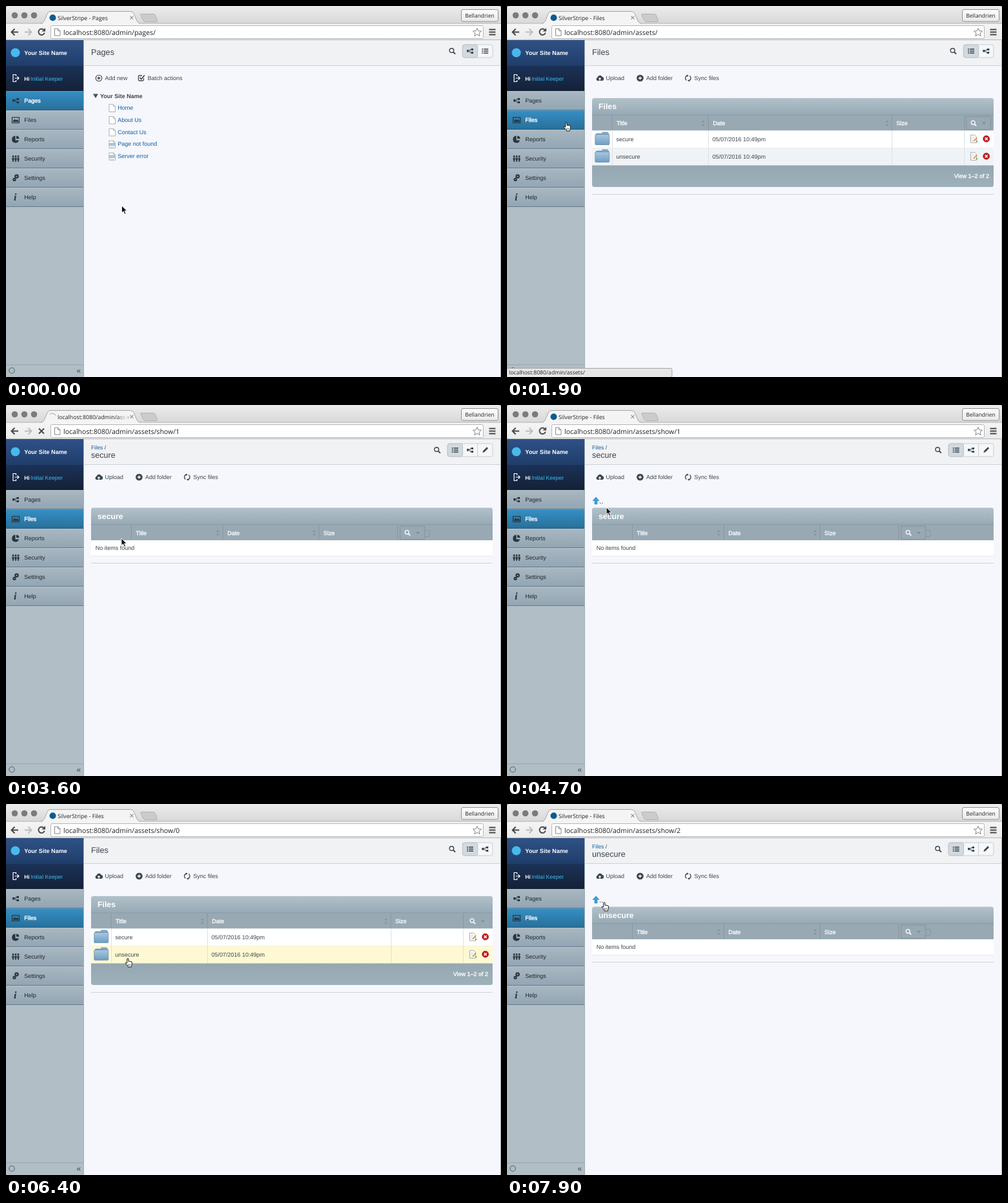
These frames come from a looping animation (768x576 px, 8000 ms). An HTML page:

```html
<!DOCTYPE html>
<html lang="en">
<head>
<meta charset="utf-8">
<title>Files admin</title>
<style>
html, body { margin: 0; width: 768px; height: 576px; overflow: hidden; background: #f6f7fc; }
svg { display: block; }
text { font: 9px "Liberation Sans", Arial, sans-serif; fill: #3b444c; text-rendering: geometricPrecision; white-space: pre; }
.ui { font-family: "Open Sans", sans-serif; fill: #222; }
.link { fill: #0a5fa8; }
.bold { font-weight: bold; }
.white { fill: #fff; }
.strong { fill: #fff; stroke: #fff; stroke-width: .3; }
.user { fill: #3ebcf3; }
.info { font-family: "Liberation Serif", serif; font-style: italic; font-weight: bold; fill: #2a353d; }
.menu { fill: #1d2830; }
.menu.hover { fill: #39454d; }
.menu.on { fill: #fff; stroke: #fff; stroke-width: .35; }
</style>
</head>
<body>
<svg id="stage" width="768" height="576" viewBox="0 0 768 576"></svg>
<script>
const LOOP = 8000, STEP = 100;
const INK = '#3c4750', DARK = '#2a353d';

const rect = (x, y, w, h, fill, more = '') =>
  `<rect x="${x}" y="${y}" width="${w}" height="${h}" fill="${fill}" ${more}/>`;
const disc = (x, y, r, fill, more = '') => `<circle cx="${x}" cy="${y}" r="${r}" fill="${fill}" ${more}/>`;
const shape = (d, fill, more = '') => `<path d="${d}" fill="${fill}" ${more}/>`;
const line = (d, color = INK, width = 1, more = '') =>
  `<path d="${d}" fill="none" stroke="${color}" stroke-width="${width}" ${more}/>`;
const text = (x, y, s, cls = '', size = 9, more = '') =>
  `<text x="${x}" y="${y}" class="${cls}" style="font-size:${size}px" ${more}>${s}</text>`;
const group = (id, body) => `<g id="${id}">${body}</g>`;
const fade = (id, from, to, dir = 'x2="0" y2="1"') =>
  `<linearGradient id="${id}" ${dir}><stop stop-color="${from}"/><stop offset="1" stop-color="${to}"/></linearGradient>`;

// Icons
const tree = (x, y, c = INK) =>
  rect(x - 5, y - 2, 3.5, 3.5, c) + rect(x + 1.5, y - 4, 3.5, 3, c) + rect(x + 1.5, y + 1, 3.5, 3, c) +
  line(`M${x - 1.5} ${y - .2}h1.500M${x + 1.5} ${y - 2.5}h-1.500v5h1.500`, c, .7);
const list = (x, y) => [-3, 0, 3].map(d =>
  rect(x - 5, y + d - .8, 2, 1.6, INK) + rect(x - 2, y + d - .8, 7, 1.6, INK)).join('');
const pencil = (x, y) => shape(`M${x - 4} ${y + 4}l1-3 5-5 2 2-5 5z`, INK) +
  line(`M${x + 2.2} ${y - 4.2}l2 2`, INK, 1.6);
const lens = (x, y, c = INK, k = 1) => disc(x - k, y - k, 3.3 * k, 'none', `stroke="${c}" stroke-width="${1.4 * k}"`) +
  line(`M${x + 1.5 * k} ${y + 1.5 * k}l${3.2 * k} ${3.2 * k}`, c, 1.9 * k);
const sorter = (x, y) => shape(`M${x - 2.5} ${y - 1.5}l2.5-3 2.5 3zM${x - 2.5} ${y + 1.5}l2.5 3 2.5-3z`, '#7f929e');
const sheet = (x, y, banner) =>
  shape(`M${x} ${y}h6.5l3 3v8.5h-9.5z`, '#fdfdfd', 'stroke="#a5a9a8" stroke-width=".9"') +
  line(`M${x + 6.5} ${y}v3h3`, '#a5a9a8', .8) +
  (banner ? rect(x, y + 4, 9.5, 4, '#8fb6cf') + line(`M${x + 1} ${y + 6}h7.5`, '#e8f1f6', 1, 'stroke-dasharray="2 .8"') +
    line(`M${x + 2} ${y + 10}h5`, '#a9c4d3', .8) : '');
const folder = (x, y) =>
  shape(`M${x + 2} ${y + 3}v-2h9v-2h8l2 2v4z`, '#86a9c4', 'stroke="#6489a7" stroke-width=".7"') +
  rect(x, y + 2.5, 22, 16, 'url(#folder)', 'rx="1.2" stroke="#5f88a8" stroke-width=".7"');
const editIcon = (x, y) => shape(`M${x} ${y}h6l3 3v9h-9z`, '#fff', 'stroke="#8b969c" stroke-width=".8"') +
  line(`M${x + 1.5} ${y + 4}h4m-4 2.5h3m-3 2.5h4`, '#b9c9d4', .8) +
  line(`M${x + 4.5} ${y + 9.5}l5-5.5`, '#dd9a3c', 2) + line(`M${x + 8} ${y + 10}h3`, '#69a84a', 1.5);
const cross = (x, y) => disc(x, y, 5, '#c2191f', 'stroke="#951217" stroke-width=".6"') +
  line(`M${x - 2} ${y - 2}l4 4m0-4l-4 4`, '#fff', 1.6);
const plus = (x, y, filled) => disc(x, y, 4.8, filled ? INK : 'none', `stroke="${INK}" stroke-width="1.1"`) +
  line(`M${x - 2.6} ${y}h5.2M${x} ${y - 2.6}v5.2`, filled ? '#fff' : INK, 1.4);

const menuIcons = [
  tree(15, 147, DARK),
  rect(9.5, 173, 11, 8.5, 'none', `stroke="${DARK}" stroke-width="1.2"`) + shape('M11 180v-2l2.5-2.5 2 2 2-1.5 2 2.5v1.5z', DARK),
  shape('M14.5 207V201.5A5.5 5.5 0 1 0 20 208.5L14.5 208.5z', DARK) + shape('M16 206V201.5A5 5 0 0 1 20.5 206z', DARK),
  [11, 15, 19].map(x => disc(x, 233.5, 1.4, DARK) + rect(x - 1.5, 235.5, 3, 4, DARK) + rect(x - .8, 239, 1.6, 3, DARK)).join(''),
  disc(16.5, 264.5, 2.2, 'none', `stroke="${DARK}" stroke-width="2.2"`) +
    disc(13, 269.5, 1.7, 'none', `stroke="${DARK}" stroke-width="1.9"`),
  text(12, 302, 'i', 'info', 16)
];

function browser() {
  return rect(0, 0, 768, 28, '#7eaac6') + rect(0, 0, 768, 40, 'url(#strip)', 'rx="4"') +
    [13.5, 28.5, 43.5].map(x => disc(x, 14.5, 4.8, '#7b7b7b')).join('') +
    shape('M209.5 12.5h19q2 0 3 2l3 8q.5 2-1.5 2h-16q-3 0-4-2l-4-8q-.5-2 .5-2z', '#cbcbcb', 'stroke="#aaa" stroke-width=".8"') +
    rect(0, 27, 768, 26, 'url(#bar)') + line('M0 27h57M207 27h561', '#b2b2b2') + line('M0 52.5h768', '#b4b7b9') +
    shape('M54 27.5q4-.5 5.5-4.5l4.5-11q1.5-3.5 5-3.5h124q4 0 5.5 3.5l4.5 11q1.5 4 5.5 4.5z', '#f4f4f4') +
    line('M54 27q4-.5 5.5-4l4.5-11q1.5-3.5 5-3.5h124q4 0 5.5 3.5l4.5 11q1.5 3.5 5.5 4', '#a8a8a8') +
    disc(72.5, 18.2, 5, '#0b5c92', 'id="favicon"') +
    line('M68 14.5A5.5 5.5 0 0 1 77 16.5', '#a4b7d8', 1.2, 'id="spinner"') +
    text(80, 21.5, '', 'ui', 8.8, 'id="tab"') + rect(172, 12, 17, 13, 'url(#tabFade)', 'id="tabEnd"') +
    line('M192.5 15.7l5 5m0-5l-5 5', '#8c8c8c', 1.1) +
    rect(706.5, 5.5, 57, 18.5, 'url(#button)', 'rx="2.5" stroke="#929292"') +
    text(735, 18, 'Bellandrien', 'ui', 8.5, 'text-anchor="middle"') +
    line('M19 40.5H9M13.5 35.5l-5 5 5 5', '#484848', 2) +
    line('M29 40.5h10M34.5 35.5l5 5-5 5', '#bcbcbc', 1.8) +
    group('reload', line('M59 37.5A4.7 4.7 0 1 0 59.7 41.5', '#484848', 1.9) + shape('M61 34v5.5h-5.5z', '#484848')) +
    line('M51 36.5l8 8m0-8l-8 8', '#484848', 2, 'id="stop"') +
    rect(69.5, 30.5, 671, 20, '#fff', 'rx="2" stroke="#b6b6b6"') +
    shape('M75.5 35h5l3.5 3.5v7.5h-8.5z', '#fff', 'stroke="#888"') + line('M80.5 35v3.5h3.5', '#888') +
    text(89, 44.5, '', 'ui', 10.55, 'id="url"') +
    shape('M731 34.5l1.9 4.2 4.6.4-3.5 3 1.1 4.5-4.1-2.4-4.1 2.4 1.1-4.5-3.5-3 4.6-.4z', '#fff', 'stroke="#777" stroke-width=".9"') +
    line('M749.5 36.5h10M749.5 40.5h10M749.5 44.5h10', '#484848', 2);
}

function sidebar() {
  const items = ['Pages', 'Files', 'Reports', 'Security', 'Settings', 'Help'].map((name, i) => {
    const y = 132 + 30 * i;
    return rect(0, y, 120, 30, 'url(#item)', `id="item${i}"`) + rect(0, y, 120, 1, '#fff', 'opacity=".15"') +
      rect(0, y + 29, 120, 1, '#1c3a52', 'opacity=".4"') + menuIcons[i] +
      text(28.3, y + 18, name, 'menu', 9, `id="label${i}"`);
  }).join('');
  return rect(0, 53, 120, 523, '#b1bec6') + rect(120, 53, 1, 523, '#a3adb3') +
    rect(0, 53, 120, 40, 'url(#brand)') + rect(0, 93, 120, 39, 'url(#user)') +
    disc(14.5, 72.5, 7, '#48b9ec') + text(28.3, 76, 'Your Site Name', 'bold white', 9.1) +
    line('M15.5 109v-2.5h-4.5v11h4.5v-2.5M13.5 112h6.5M17.5 109.5l2.5 2.5-2.5 2.5', '#fff', 1.2) +
    text(28.3, 115.5, 'Hi', 'bold white', 8.3) + text(38, 115.5, 'Initial Keeper', 'user', 8.6) +
    items + line('M0 557h120', '#94a4ae') + disc(9, 566, 4.2, 'none', 'stroke="#55636d" stroke-width="1.1"') +
    text(109.5, 570, '«', '', 12);
}

// Header buttons, right aligned; the first is active.
function modes(icons) {
  const x0 = 755 - 23.3 * icons.length;
  return lens(x0 - 16, 70) + rect(x0, 60, 755 - x0, 20, '#f6f7f9', 'rx="3" stroke="#c9ced2"') +
    rect(x0, 60, 23.3, 20, '#d2dae0', 'rx="3" stroke="#b9c2c9"') +
    icons.map((icon, i) => icon(x0 + 23.3 * i + 11.6, 70) +
      (i > 1 ? line(`M${x0 + 23.3 * i} 60v20`, '#c9ced2') : '')).join('');
}

const fileTools = shape('M140.5 116a2.7 2.7 0 0 1 0-5.2 3.8 3.8 0 0 1 7.2-.7 3 3 0 0 1 .3 5.9z', INK) +
  line('M144 116v-4M142.3 113.5l1.7-1.7 1.7 1.7', '#f6f7fc', 1.1) + text(153.5, 115, 'Upload') +
  plus(206.5, 112, true) + text(216, 115, 'Add folder') +
  line('M279.5 107.8A4.5 4.5 0 0 0 278.5 115.5M282.5 116.2A4.5 4.5 0 0 0 283.5 108.5', INK, 1.4) +
  shape('M279 106.5l3 1.5-3 2zM283 117.5l-3-1.5 3-2z', INK) + text(290.5, 115, 'Sync files');

function tableTop(id, y, cols, searchX, title) {
  const [a, b, c, d] = cols, mid = y + 39.5;
  return shape(`M132 ${y + 27}v-23q0-3.5 3.5-3.5h616q3.5 0 3.5 3.5v23z`, 'url(#tableTitle)') +
    rect(132, y + 26.5, 623, 24.5, '#98a9b3') + line(`M132 ${y + 26.5}h623`, '#8799a5', .8) +
    line(cols.map(x => `M${x} ${y + 27}v24`).join(''), '#8798a4') +
    text(142, y + 17.5, title, 'bold white', 12.3, `id="${id}Title"`) +
    text(a + 7, mid + 3, 'Title', 'strong') + text(b + 7, mid + 3, 'Date', 'strong') + text(c + 7, mid + 3, 'Size', 'strong') +
    sorter(b - 8, mid) + sorter(c - 7.5, mid) + lens(searchX, mid, '#fff', .9) +
    shape(`M${searchX + 13} ${mid - 1.5}h6l-3 3.5z`, '#7d8f9a') +
    group(id + 'Ring', rect(searchX - 11.5, mid - 10.5, 38, 20.5, 'none', 'stroke="#8a999f" stroke-width="1.4" rx="1"') +
      (d < 700 ? line(`M${searchX + 27} ${mid - 4}h5q2 0 2 2v6q0 2-2 2h-5`, '#8698a3') : ''));
}

function pagesView() {
  const rows = ['Home', 'About Us', 'Contact Us', 'Page not found', 'Server error'].map((name, i) =>
    sheet(160, 152.8 + 18.75 * i, i > 2) + text(173.3, 161 + 18.75 * i, name, 'link')).join('');
  return text(132, 76, 'Pages', '', 12.7) + modes([tree, list]) + plus(144, 112) + text(153.5, 115, 'Add new') +
    line('M213.5 112v2.5q0 1.5-1.5 1.5h-5q-1.5 0-1.5-1.5v-5q0-1.5 1.5-1.5h4', INK, 1.3) +
    line('M207.5 111l2.3 2.5 5.2-6', INK, 1.8) + text(219.8, 115, 'Batch actions') +
    shape('M135 136.5h8l-4 6.5z', '#4a5157') + text(146, 142.5, 'Your Site Name', 'bold') + rows;
}

function filesView() {
  const rows = ['secure', 'unsecure'].map((name, i) => {
    const y = 193.5 + 27 * i;
    return rect(132, y, 623, 27, '#fff', `id="row${i}"`) + line(`M132 ${y + 27}h623`, '#dfe3e6', .7) +
      folder(136.8, y + 3.5) + text(169.5, y + 16.5, name) + text(318.8, y + 16.5, '05/07/2016 10:49pm') +
      editIcon(719.5, y + 6.8) + cross(743.7, y + 12.7);
  }).join('');
  return text(132, 76, 'Files', '', 12.7) + modes([list, tree]) + fileTools +
    tableTop('files', 142.5, [163, 312.5, 597, 709.5], 724, 'Files') +
    rows + line('M163.5 194v53.5M312.5 194v53.5M597.5 194v53.5M709.5 194v53.5', '#d9dee2', .9) +
    shape('M132 247.5h623v30q0 3.5-3.5 3.5h-616q-3.5 0-3.5-3.5z', 'url(#tableFoot)') +
    text(748, 267, 'View 1–2 of 2', 'strong', 9, 'text-anchor="end"') + line('M132 292.5h623', '#cfd3d8');
}

function folderView() {
  return text(132, 68.5, 'Files <tspan fill="#3b444c">/</tspan>', 'link', 8.7) + text(132, 81.5, '', '', 12.6, 'id="crumb"') +
    modes([list, tree, pencil]) + fileTools +
    group('up', shape('M138 143l5 5.5h-3v5.5h-4v-5.5h-3z', '#3b9fdc', 'stroke="#2c83bb" stroke-width=".6"') + text(143, 153, '..', '', 12)) +
    tableTop('folder', 159, [194.5, 336.5, 485.5, 607.5], 623, '') +
    rect(132, 210, 623, 24.5, '#fff') + line('M132 234.5h623', '#e6e9ec') + text(138.8, 225, 'No items found') +
    line('M132 245.5h623', '#cfd3d8');
}

stage.innerHTML = '<defs>' +
  fade('strip', '#ececec', '#cfcfcf') + fade('bar', '#f5f5f5', '#ebebeb') + fade('button', '#fdfdfd', '#eaeaea') +
  fade('tabFade', '#f4f4f400', '#f4f4f4', '') + fade('brand', '#2f5186', '#1f3d6a') + fade('user', '#1b3257', '#142137') +
  fade('item', '#a9b8c2', '#92a5b3') + fade('hover', '#93a6af', '#a0b1ba') + fade('active', '#358fc4', '#286f9a') +
  fade('tableTitle', '#b2c1ca', '#96a9b4') + fade('tableFoot', '#95a7b1', '#9eb1bb') + fade('folder', '#a9c8e0', '#6f9dc2') +
  '</defs>' +
  rect(121, 53, 647, 523, '#f6f7fc') + rect(121, 53, 647, 39, '#f1f2f4') + line('M121 92.5h647', '#cdd2d5') +
  group('pages', pagesView()) + group('files', filesView()) + group('folderPage', folderView()) +
  group('overlay', rect(121, 53, 647, 523, '#afb7b8', 'opacity=".35"') + rect(427.5, 298.5, 32.5, 32.5, '#fff') + disc(444, 315, 10.5, '#0a5790')) +
  browser() + sidebar() + line('M767.5 53v523', '#a9b4bd') +
  group('status', rect(-1, 562.5, 257, 14, '#e6e6e6', 'rx="2" stroke="#a5a5a5"') + text(3, 572.3, '', 'ui', 8.6, 'id="statusText"')) +
  group('arrow', shape('M0 0v11.2l2.6-2.4 2 4.5 2-.9-2-4.3h3.6z', '#111', 'stroke="#fff" stroke-width=".9"')) +
  group('hand', shape('M-1.2 1q0-1.3 1.1-1.3t1.1 1.3v3.4q.8-.7 1.9 0 1.1-.6 1.9.3 1.6-.3 1.6 1.3v3q0 1.5-1 2.8v1.2h-5.2v-1.2l-3.8-4.2q-.7-1.3.5-1.5 1 0 1.9 1.2z', '#fff', 'stroke="#111" stroke-width=".95"') +
    line('M2.2 8.5v2.5M4 8.5v2.5M.5 8.5v2.5', '#111', .6));

const $ = id => document.getElementById(id);
const show = (id, on) => $(id).style.display = on ? '' : 'none';
const during = (t, ...spans) => spans.some(([a, b]) => t >= a && t < b);
const latest = (t, steps) => steps.filter(([at]) => t >= at).pop()[1];

const path = [[0, 179.5, 310], [400, 179.5, 310], [1000, 92, 181], [2400, 92, 181], [3000, 179, 207], [4200, 179, 207],
  [4900, 148, 147], [5500, 148, 147], [6300, 189, 240], [7400, 189, 240], [7900, 151, 153], [LOOP, 151, 153]];

function pointer(t) {
  const i = path.findIndex(p => p[0] > t), [t0, x0, y0] = path[i - 1], [t1, x1, y1] = path[i];
  const u = (t - t0) / (t1 - t0), k = u * u * (3 - 2 * u);
  return [x0 + (x1 - x0) * k, y0 + (y1 - y0) * k];
}

function draw(t) {
  const [x, y] = pointer(t);
  const page = latest(t, [[0, 'pages'], [1900, 'files'], [3400, 'secure'], [5900, 'files'], [7000, 'unsecure']]);
  const inFolder = page.endsWith('secure');
  const busy = during(t, [1300, 1900], [3200, 3400], [5100, 5900], [6600, 7000]);
  const titleBusy = during(t, [1400, 1900], [3400, 3700], [5200, 5900], [6700, 7000]);
  const reloading = during(t, [3400, 3700]);
  const up = inFolder && !during(t, [3400, 3700], [7000, 7100]);
  const ring = during(t, [1900, 2800], [3400, 5100], [7000, LOOP]);
  const overMenu = x < 121 && y > 162 && y < 192;
  const overRow = page === 'files' && x > 132 && y > 193.5 && y < 247.5 ? Math.floor((y - 193.5) / 27) : -1;
  const overUp = up && x < 154 && y > 140 && y < 156;

  show('pages', page === 'pages');
  show('files', page === 'files');
  show('folderPage', inFolder);
  show('overlay', busy);
  show('up', up);
  show('filesRing', ring);
  show('folderRing', ring);
  show('reload', !reloading);
  show('stop', reloading);
  show('favicon', !reloading);
  show('spinner', reloading);
  $('spinner').setAttribute('transform', `rotate(${t * .36 - 216} 72.5 18.2)`);
  show('tabEnd', titleBusy);

  $('tab').textContent = titleBusy ? 'localhost:8080/admin/asse' : 'SilverStripe - ' + (page === 'pages' ? 'Pages' : 'Files');
  $('url').textContent = 'localhost:8080/admin/' +
    latest(t, [[0, 'pages/'], [1300, 'assets/'], [3200, 'assets/show/1'], [5100, 'assets/show/0'], [6600, 'assets/show/2']]);
  $('crumb').textContent = $('folderTitle').textContent = page;
  show('status', during(t, [1000, 2700], [5000, 5900]));
  $('statusText').textContent = 'localhost:8080/admin/assets/' + (t < 3000 ? '' : 'show/0');

  const active = page === 'pages' ? 0 : 1;
  for (let i = 0; i < 6; i++) {
    const state = i === active ? 'on' : i === 1 && overMenu ? 'hover' : '';
    $('item' + i).setAttribute('fill', `url(#${{ on: 'active', hover: 'hover' }[state] || 'item'})`);
    $('label' + i).setAttribute('class', 'menu ' + state);
  }
  ['#fff', '#f0f3f6'].forEach((c, i) => $('row' + i).setAttribute('fill', i === overRow ? '#fff9d3' : c));

  const hand = overMenu || !busy && (overRow >= 0 || overUp);
  show('hand', hand);
  show('arrow', !hand);
  for (const id of ['hand', 'arrow']) $(id).setAttribute('transform', `translate(${x} ${y})`);
}

const start = performance.now();
function tick() {
  const t = (performance.now() - start) % LOOP;
  draw(Math.floor(t / STEP) * STEP);
  requestAnimationFrame(tick);
}
tick();
</script>
</body>
</html>
```
